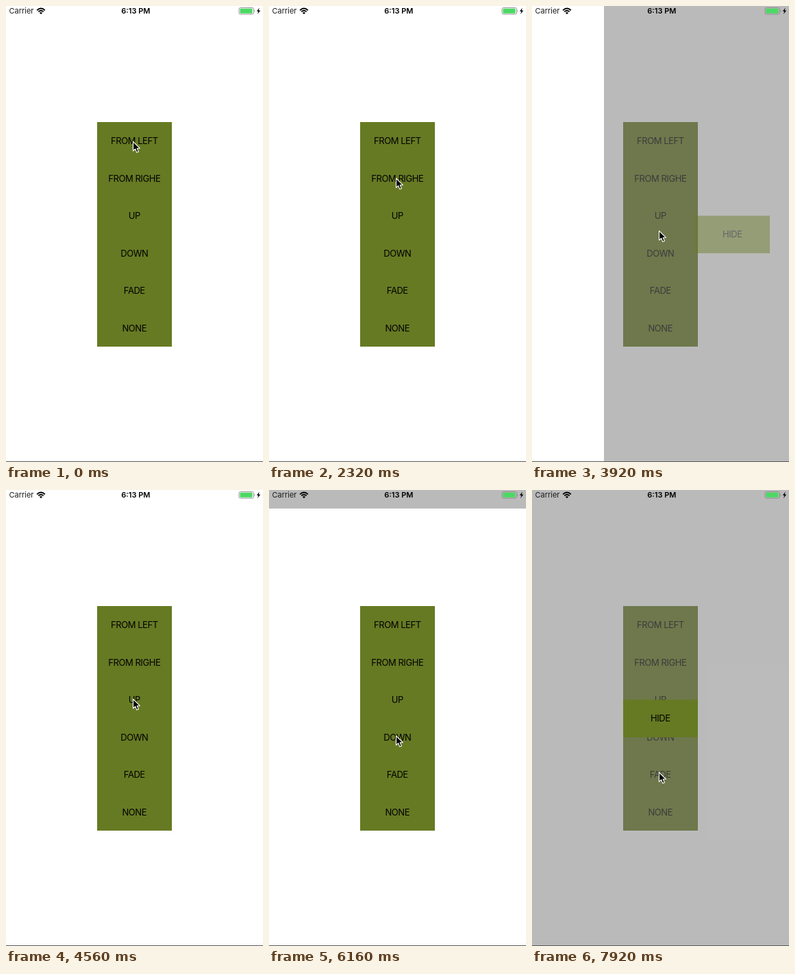
These frames come from a looping animation (375 px wide and 664 px high, 8000 ms). An HTML page:

```html
<!DOCTYPE html>
<html lang="en">
<head>
<meta charset="utf-8">
<title>Overlay transitions</title>
<style>
  html, body { margin: 0; width: 100%; height: 100%; overflow: hidden; background: #fff; }
  svg { display: block; width: 375px; height: 664px; }
  text { font-family: Inter, Roboto, sans-serif; }
  .label { font-size: 13px; letter-spacing: -.45px; text-anchor: middle; }
  .status { font-size: 11px; fill: #1c1c1c; }
  .clock { font-weight: 600; text-anchor: middle; fill: #000; }
  .olive { fill: #667a23; }
</style>
</head>
<body>
<svg viewBox="0 0 375 664">
  <rect width="375" height="664" fill="#fff"/>
  <g id="menu"><rect class="olive" x="133" y="169" width="109" height="327"/></g>
  <g id="overlay">
    <rect width="375" height="664" fill="#777" fill-opacity=".5"/>
    <g id="hide">
      <rect class="olive" x="133" y="305.4" width="109" height="54.6"/>
      <text class="label" x="187.3" y="337.4">HIDE</text>
    </g>
  </g>
  <g id="bar">
    <text class="status" x="4.5" y="11">Carrier</text>
    <g fill="none" stroke="#000" stroke-width="1.9">
      <path d="M45.2 6.2Q51 .8 56.8 6.2"/>
      <path d="M47.3 8.4Q51 5 54.7 8.4"/>
    </g>
    <path d="M48.9 9.9Q51 8.2 53.1 9.9L51 12Z"/>
    <text class="status clock" x="189.3" y="11">6:13 PM</text>
    <rect x="340" y="2.5" width="21.5" height="9.5" rx="2.2" fill="none" stroke="#8b8b8b" stroke-width=".9"/>
    <rect x="341.4" y="3.8" width="18.2" height="6.9" rx="1" fill="#4cd964"/>
    <path d="M362.6 5.6Q364.2 7.2 362.6 8.9Z" fill="#777"/>
    <path d="M369.8 2.4L365.8 7.8H368.2L367 12L371.2 6.4H368.6Z"/>
  </g>
  <rect y="663" width="375" height="1" fill="#5a5a5a"/>
  <path id="cursor" d="M.5 .5V14L3.6 11.1L5.8 16.3L8.4 15.2L6.2 10.2H10.3Z"
        fill="#000" stroke="#fff" stroke-width="1.1" stroke-linejoin="round"/>
</svg>
<script>
const LOOP = 8000, STEP = 80, SLIDE = 350, W = 375, H = 664;
const $ = id => document.getElementById(id);

["FROM LEFT", "FROM RIGHE", "UP", "DOWN", "FADE", "NONE"].forEach((name, i) => {
  const t = document.createElementNS("http://www.w3.org/2000/svg", "text");
  t.setAttribute("class", "label");
  t.setAttribute("x", 187.3);
  t.setAttribute("y", 201.2 + i * 54.55);
  t.textContent = name;
  $("menu").append(t);
});

// One visit per menu row: opening, closing, off-stage side, pointer height on HIDE
const visits = [
  { show: 0,    hide: 1280, dx: -W, dy: 0,  press: 327 },
  { show: 2335, hide: 3789, dx: W,  dy: 0,  press: 327 },
  { show: 4600, hide: 5370, dx: 0,  dy: H,  press: 321 },
  { show: 6110, hide: 6850, dx: 0,  dy: -H, press: 340 },
  { show: 7480, hide: 9000, dx: 0,  dy: 0,  press: 327, fade: true }
];

const clamp = v => Math.min(1, Math.max(0, v));
const ease = v => v < .5 ? 2 * v * v : 1 - 2 * (1 - v) ** 2;
const phase = (t, from, to) => clamp((t - from) / (to - from));
const rowTip = i => 197 + 53.5 * i;

// The hand bends left on longer moves
function move(k, from, to) {
  const bend = Math.abs(to - from) * .085 * Math.sin(Math.PI * k);
  return [185 - bend, from + (to - from) * k];
}

function pointer(t, i) {
  const v = visits[i], next = visits[i + 1], leave = v.hide + 270;
  if (next && t > leave) {
    return move(ease(phase(t, leave, next.show - 60)), v.press, rowTip(i + 1));
  }
  return move(ease(phase(t, v.show + 400, v.hide - 110)), rowTip(i), v.press);
}

function draw(t) {
  const i = visits.filter(s => t >= s.show).length - 1, v = visits[i];
  const shown = ease(phase(t, v.show, v.show + SLIDE)) - ease(phase(t, v.hide, v.hide + SLIDE));
  const away = d => Math.round(d * (1 - shown));
  const overlay = $("overlay");
  overlay.setAttribute("visibility", shown > 0 ? "visible" : "hidden");
  overlay.setAttribute("transform", `translate(${away(v.dx)} ${away(v.dy)})`);
  overlay.setAttribute("opacity", v.fade ? shown : 1);

  // HIDE dims under the press, then recovers
  const dim = phase(t, v.hide - 110, v.hide - 10) - phase(t, v.hide, v.hide + 500);
  $("hide").setAttribute("opacity", 1 - .75 * dim);
  $("cursor").setAttribute("transform", `translate(${pointer(t, i)})`);
}

const begin = performance.now();
function tick() {
  const t = (performance.now() - begin) % LOOP;
  draw(Math.floor(t / STEP) * STEP);
  requestAnimationFrame(tick);
}
tick();
</script>
</body>
</html>
```
